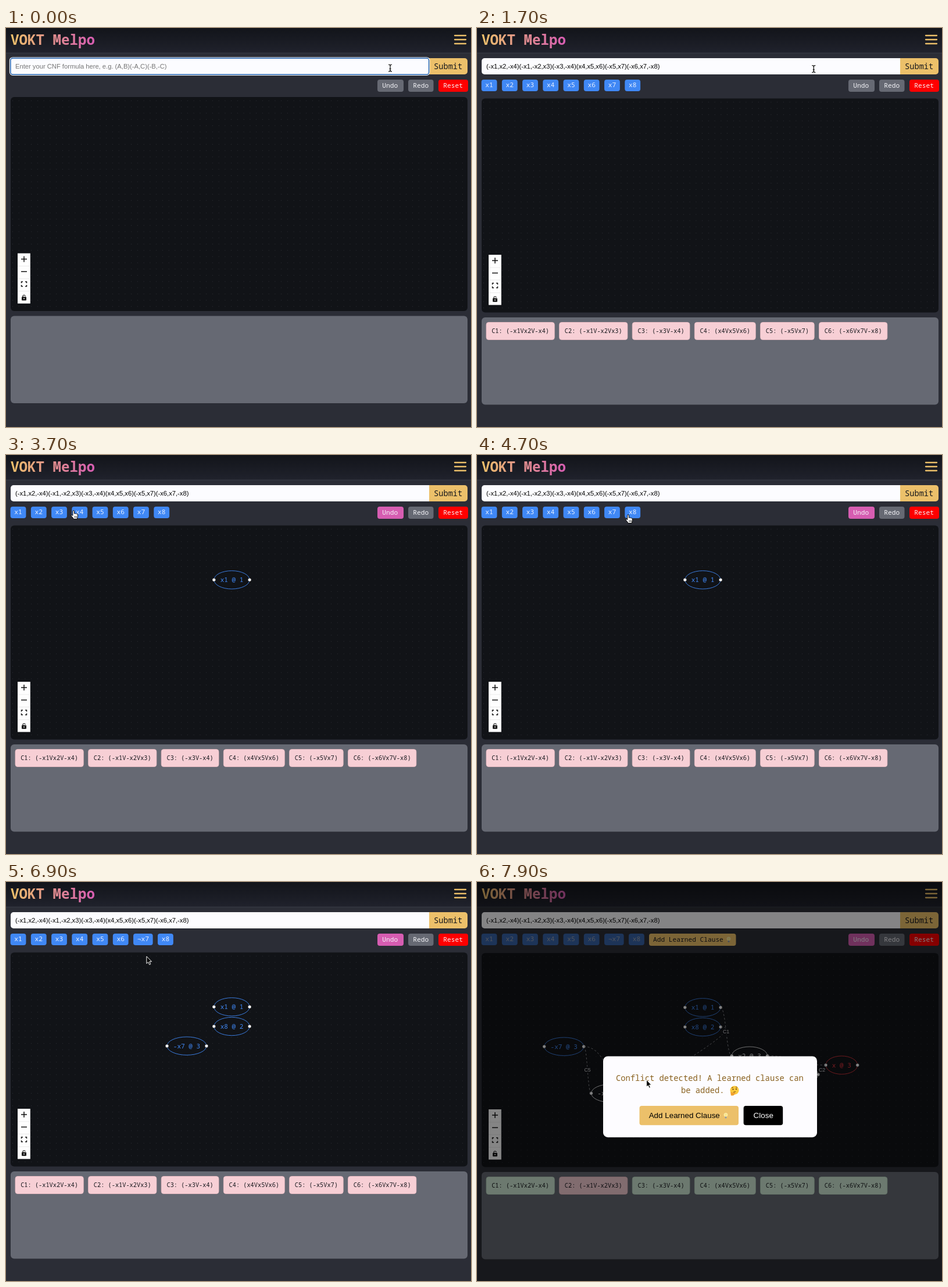
These frames come from a looping animation (800 px wide and 688 px high, 8 s). An HTML page:

```html
<!DOCTYPE html>
<html lang="en">
<head>
<meta charset="utf-8">
<title>Clause learning demo</title>
<style>
  html, body { margin: 0; width: 100%; height: 100%; overflow: hidden; background: #2b2d36; }
  svg { position: absolute; left: 0; top: 0; }
  text { white-space: pre; }
  .mono { font-family: "Noto Sans Mono", "DejaVu Sans Mono", monospace; }
  .sans { font-family: "Liberation Sans", Arial, sans-serif; }
</style>
</head>
<body>
<svg width="800" height="688" viewBox="0 0 800 688">
  <defs>
    <linearGradient id="head" x2="0" y2="1">
      <stop stop-color="#12141a"/><stop offset="1" stop-color="#20222c"/>
    </linearGradient>
    <linearGradient id="brand" gradientUnits="userSpaceOnUse" x1="8" x2="152">
      <stop stop-color="#ecc06a"/><stop offset="1" stop-color="#d65db1"/>
    </linearGradient>
    <pattern id="dots" x="6" y="120" width="10.75" height="10.75" patternUnits="userSpaceOnUse">
      <circle cx="5.4" cy="5.4" r=".55" fill="#34363d"/>
    </pattern>
  </defs>
  <g id="page"></g>
  <g id="cursor"></g>
</svg>
<script>
const LOOP = 8000;
const GOLD = '#ecc06a', PINK = '#d65db1', GREY = '#666973', DARK = '#111317',
      BLUE = '#4088f5', INK = '#17181d', PAPER = '#fcfcff';
const FORMULA = '(-x1,x2,-x4)(-x1,-x2,x3)(-x3,-x4)(x4,x5,x6)(-x5,x7)(-x6,x7,-x8)';
const CLAUSES = FORMULA.slice(1, -1).split(')(')
  .map((c, i) => `C${i + 1}: (${c.replaceAll(',', 'V')})`);

// Moments at which the page changes
const STAGES = [0, 400, 1000, 1200, 3000, 5000, 6300, 6700, 7000, 7700];
const [EMPTY, PASTED, BLURRED, SUBMITTED, FIRST, SECOND, NEGATED, THIRD, IMPLIED, CONFLICT] = STAGES.keys();

// Pointer stops: time, x, y
const STOPS = [
  [0, 661, 69], [400, 661, 69], [900, 773, 63], [1300, 773, 63], [2500, 29, 92], [3200, 29, 92],
  [4400, 260, 103.5], [5200, 260, 103.5], [5700, 245, 111], [6050, 245, 111],
  [6250, 236, 103], [6800, 236, 103], [7300, 291.5, 341], [LOOP, 291.5, 341]
];

const rect = (x, y, w, h, fill, r = 4, more = '') =>
  `<rect x="${x}" y="${y}" width="${w}" height="${h}" rx="${r}" fill="${fill}" ${more}/>`;
const line = (d, color, width, more = '') =>
  `<path d="${d}" fill="none" stroke="${color}" stroke-width="${width}" ${more}/>`;
const text = (s, x, y, size, fill, font = 'mono', more = '') =>
  `<text class="${font}" x="${x}" y="${y}" font-size="${size}" fill="${fill}" ${more}>${s}</text>`;
const group = (s, y, more = '') => `<g transform="translate(0 ${y})" ${more}>${s}</g>`;

const button = (s, x, w, fill, color = '#f4f4f8', pad = 8.3) =>
  rect(x, 89, w, 21, fill) + text(s, x + pad, 103.2, 11.2, color);

const bulb = (x, y) => `<circle cx="${x}" cy="${y - 1.5}" r="3" fill="#fbe68a" stroke="#fff6c9" stroke-width=".7"/>`
  + rect(x - 1.4, y + 1.5, 2.8, 3, '#8d99a6', 1);

function header() {
  const bars = [13, 20, 27].map(y => `M772 ${y}H791`).join('');
  return rect(0, 0, 800, 43, 'url(#head)', 0) + rect(0, 42.6, 800, 1, '#3b3e48', 0)
    + text('VOKT Melpo', 8, 28.5, 24.2, 'url(#brand)', 'mono', 'font-weight="700"')
    + line(bars, GOLD, 2.3, 'stroke-linecap="round"');
}

function form(stage) {
  const typed = stage >= PASTED;
  let s = `<path d="M728 52h61a5 5 0 0 1 5 5v18a5 5 0 0 1-5 5h-61z" fill="${GOLD}"/>`
    + text('Submit', 736, 70.7, 13.7, INK)
    + `<path d="M728 52H13a5 5 0 0 0-5 5v18a5 5 0 0 0 5 5h715z" fill="${PAPER}"/>`;
  if (stage < BLURRED)
    s += rect(6.6, 50.9, 722, 30.4, 'none', 5, 'stroke="#fff" stroke-width="1.4"')
      + rect(7.8, 52, 719.8, 28.2, PAPER, 4, 'stroke="#1d5fae" stroke-width="1.5"');
  return s + text(typed ? FORMULA : 'Enter your CNF formula here, e.g. (A,B)(-A,C)(-B,-C)',
    16, 70.4, 11.2, typed ? '#000' : '#757575', 'sans');
}

function toolbar(stage) {
  let s = button('Undo', 639, 45, stage >= FIRST ? PINK : GREY)
    + button('Redo', 692, 43.5, GREY) + button('Reset', 744, 51, '#f00');
  if (stage < SUBMITTED) return s;
  let x = 7.6, vars = '';
  for (let i = 1; i <= 8; i++) {
    const name = (i === 7 && stage >= NEGATED ? '¬x' : 'x') + i;
    const w = 13.4 + name.length * 6.72;
    vars += rect(x, 89, w, 20, BLUE) + text(name, x + 6.7, 102.4, 11.2, '#e8f0ff');
    x += w + 8.4;
  }
  if (stage < CONFLICT) return s + vars;
  return s + `<g opacity=".6">${vars}</g>`
    + button('Add Learned Clause', 296, 149.5, GOLD, INK, 7) + bulb(433, 99.5);
}

function controls() {
  let s = rect(20, 388.5, 21.8, 86.6, '#fefefe', 0);
  for (let i = 1; i < 4; i++) s += rect(20, 388.5 + i * 21.65, 21.8, .8, '#e6e6e6', 0);
  return s + line('M26 398.5h10M31 393.5v10M26 420h10', '#111', 1.5)
    + line('M29 437.5h-2.5v2.5M33 437.5h2.5v2.5M29 445.5h-2.5v-2.5M33 445.5h2.5v-2.5', '#111', 1.4)
    + rect(27, 463.5, 8, 6.3, '#111', 1) + line('M29 464v-1.5a2 2 0 0 1 4 0', '#111', 1.2)
    + `<circle cx="31" cy="466.5" r="1" fill="#fff"/>`;
}

// A node is placed by its left handle
function node(label, x, y, color) {
  const w = 21.4 + label.length * 6.65;
  const handle = cx => `<circle cx="${cx}" cy="${y}" r="2.8" fill="#fff" stroke="${DARK}" stroke-width=".5"/>`;
  return `<ellipse cx="${x + w / 2}" cy="${y}" rx="${w / 2}" ry="15.7" fill="${DARK}" stroke="${color}" stroke-width=".9"/>`
    + text(label, x + w / 2, y + 4, 11, color, 'mono', 'text-anchor="middle"') + handle(x) + handle(x + w);
}

function edge(label, x1, y1, x2, y2) {
  const dx = x2 - x1, bend = dx >= 0 ? dx / 2 : 5.1 * Math.sqrt(-dx);
  const mx = (x1 + x2) / 2, my = (y1 + y2) / 2;
  return line(`M${x1} ${y1}C${x1 + bend} ${y1} ${x2 - bend} ${y2} ${x2} ${y2}`, '#a2a3a8', .8, 'stroke-dasharray="3.3 3.3"')
    + rect(mx - 6.5, my - 5.5, 13, 11, DARK, 1)
    + text(label, mx, my + 3, 8.8, '#d4d4d8', 'sans', 'text-anchor="middle"');
}

function graph(stage) {
  const done = stage >= CONFLICT, shift = done ? -161.3 : 0;
  let nodes = '', edges = '';
  if (stage >= FIRST) nodes += node('x1 @ 1', 357.8, 215.3, BLUE);
  if (stage >= SECOND) nodes += node('x8 @ 2', 357.8, 249, BLUE);
  if (stage >= THIRD) nodes += node('-x7 @ 3', 277 + shift, 282.7, BLUE);
  if (stage >= IMPLIED) {
    const x = 345 + shift;
    nodes += node('-x5 @ 3', 357.8 + shift, 363.3, '#eee') + node('-x6 @ 3', 438.3 + shift, 379.7, '#eee');
    edges += edge('C5', x, 282.7, 357.8 + shift, 363.3) + edge('C6', x, 282.7, 438.3 + shift, 379.7)
      + edge('C6', 419, 249, 438.3 + shift, 379.7);
  }
  if (done) {
    nodes += node('x2 @ 3', 438.3, 298.7, '#eee') + node('-x3 @ 3', 519, 331, '#eee')
      + node('x @ 3', 600, 314.7, '#e5343d') + node('x4 @ 3', 357.8, 347, '#eee');
    edges += edge('C1', 419, 215.3, 438.3, 298.7) + edge('C1', 419, 347, 438.3, 298.7)
      + edge('C3', 419, 347, 519, 331) + edge('C2', 500, 298.7, 600, 314.7) + edge('C2', 587, 331, 600, 314.7);
  }
  return nodes + edges;
}

function chips(stage) {
  let x = 16;
  return CLAUSES.map((label, i) => {
    const green = stage >= CONFLICT ? i !== 1 : stage >= IMPLIED && i > 2;
    const w = 18.4 + label.length * 6.18;
    const s = rect(x, 505, w, 30, green ? '#cfe8d5' : '#f7cfd5', 4, `stroke="${green ? '#bddcc5' : '#efbfc7'}" stroke-width=".8"`)
      + text(label, x + 9.2, 523.6, 10.3, INK);
    x += w + 8.35;
    return s;
  }).join('');
}

function modal() {
  const face = `<circle cx="443" cy="359" r="7.6" fill="#fbc93d"/>`
    + line('M438 355l3-1M445 353.5l3 .5', '#7a4b12', 1) + line('M441 362.5l4-1', '#7a4b12', 1.1)
    + `<circle cx="440.5" cy="357.5" r="1.1" fill="#4d2f10"/><circle cx="446" cy="357" r="1.1" fill="#4d2f10"/>`
    + `<path d="M436 362l5 1.5 3-.2v2l-3 3h-4z" fill="#f0a02e"/>`;
  return rect(0, 0, 800, 688, '#000', 0, 'opacity=".48"')
    + rect(217, 300.5, 368, 139.7, '#fdfcff', 8)
    + text('Conflict detected! A learned clause can', 239, 343.3, 13.8, '#8a6220')
    + text('be added.', 351, 364, 13.8, '#8a6220') + face
    + rect(279.5, 386, 170.5, 33.3, GOLD) + text('Add Learned Clause', 295.7, 406.8, 13.4, '#000', 'sans') + bulb(428, 403)
    + rect(458.6, 386, 67.6, 33.3, '#000') + text('Close', 475.6, 406.8, 13.4, '#fff', 'sans');
}

function page(stage) {
  const drop = stage >= CONFLICT ? 3.5 : stage >= SUBMITTED ? 2.5 : 0;
  const board = rect(8, 119, 786, 369, DARK, 6) + rect(8, 119, 786, 369, 'url(#dots)', 6)
    + group(graph(stage), -2.5) + controls()
    + rect(8, 496.5, 786, 150.5, GREY, 6) + (stage >= SUBMITTED ? chips(stage) : '');
  return header() + form(stage) + toolbar(stage) + group(board, drop) + (stage >= CONFLICT ? modal() : '');
}

// Pointer shapes with the hotspot at the origin
const OUTLINE = 'stroke-linejoin="round" stroke-width="1"';
const BEAM = 'M-3-6q3 0 3 2q0-2 3-2M0-4v8M-3 6q3 0 3-2q0 2 3 2M-1.5 1.5h3';
const POINTERS = {
  beam: line(BEAM, '#fff', 2.4) + line(BEAM, '#000', 1.2),
  hand: `<path d="M-1.3.8a1.3 1.3 0 0 1 2.6 0v4q1-.9 2 .1q1.1-.7 2 .4q1.7-.4 2 1.2v3q-.2 1.7-1.2 4.5h-6q-1-2.4-3.4-4.6q-1.2-1.6-.2-2.2q1.1-.4 2.2 1z" fill="#fff" stroke="#000" ${OUTLINE}/>`
    + line('M1.8 9v3M3.6 9v3M5.3 9v3', '#000', .7),
  arrow: `<path d="M0 0v12.4l2.8-2.6 2 4.5 2.1-.9-2-4.4h3.8z" fill="#000" stroke="#fff" ${OUTLINE}/>`
};

function pointer(t, stage) {
  const i = STOPS.findIndex(s => s[0] > t);
  const [t0, x0, y0] = STOPS[i - 1], [t1, x1, y1] = STOPS[i];
  const p = (t - t0) / (t1 - t0), e = p * p * (3 - 2 * p);
  const x = x0 + (x1 - x0) * e, y = y0 + (y1 - y0) * e;
  const inForm = y >= 52 && y <= 80;
  const onVars = stage >= SUBMITTED && y >= 89 && y <= 109 && x >= 8 && x <= 281;
  const kind = inForm && x < 728 ? 'beam' : inForm || onVars ? 'hand' : 'arrow';
  return `<g transform="translate(${x} ${y})">${POINTERS[kind]}</g>`;
}

const pageBox = document.getElementById('page'), cursorBox = document.getElementById('cursor');
let shown = -1;
function draw(now) {
  const t = now % LOOP;
  const stage = STAGES.findLastIndex(start => start <= t);
  if (stage !== shown) pageBox.innerHTML = page(shown = stage);
  cursorBox.innerHTML = pointer(t, stage);
  requestAnimationFrame(() => draw(performance.now()));
}
draw(performance.now());
</script>
</body>
</html>
```
